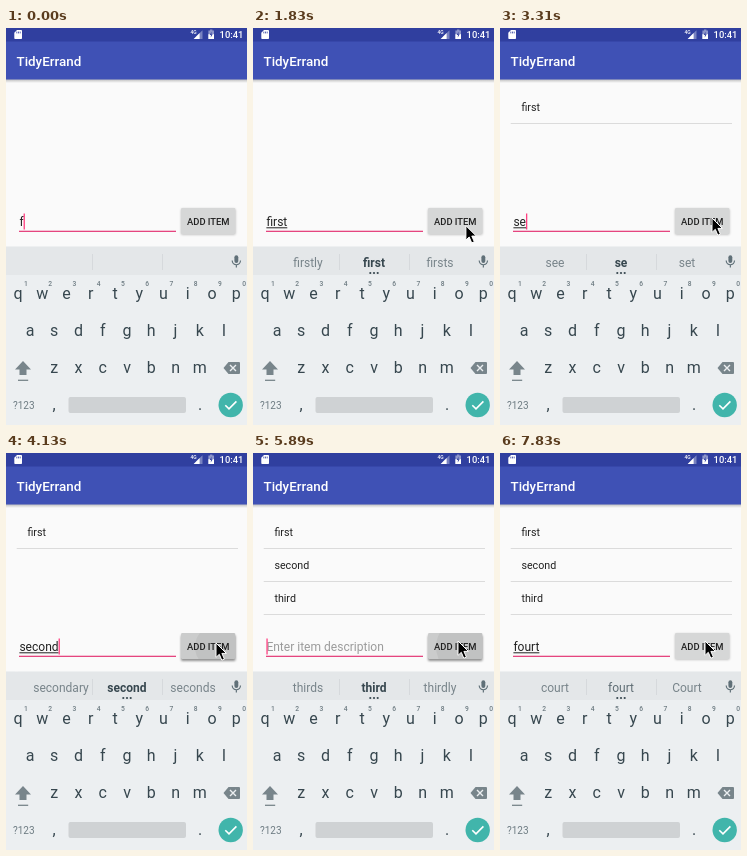
An HTML page that plays this animation: 241x397 px, repeating every 8 s.

```html
<!DOCTYPE html>
<html lang="en">
<head>
<meta charset="utf-8">
<title>To-do list</title>
<style>
html, body { margin: 0; width: 100%; height: 100%; overflow: hidden; background: #fafafa; }
svg { display: block; width: 100vw; height: 100vh; font-family: Roboto, sans-serif; }
.mid { text-anchor: middle; }
.medium { font-weight: 500; }
</style>
</head>
<body>
<svg id="stage" viewBox="0 0 241 397">
  <defs>
    <linearGradient id="shade" x2="0" y2="1">
      <stop stop-color="#000" stop-opacity=".26"/>
      <stop offset="1" stop-color="#000" stop-opacity="0"/>
    </linearGradient>
    <filter id="soft" x="-20%" y="-30%" width="140%" height="170%"><feGaussianBlur stdDeviation="1.1"/></filter>
    <clipPath id="face"><rect x="175" y="180" width="54.5" height="26" rx="1.4"/></clipPath>
  </defs>
  <rect width="241" height="397" fill="#fafafa"/>

  <rect y="51" width="241" height="4" fill="url(#shade)"/>
  <rect y="13" width="241" height="38.5" fill="#3f51b5"/>
  <rect width="241" height="13.5" fill="#303f9f"/>
  <g fill="#fff">
    <path d="M11 2H15.2Q16 2 16 2.8V10.2Q16 11 15.2 11H9.1Q8.3 11 8.3 10.2V4.7Z"/>
    <path d="M10.8 3.6V5.4M12.5 3.6V5.4M14.2 3.6V5.4" stroke="#303f9f" stroke-width=".8"/>
    <text x="184.5" y="5.8" font-size="5" class="medium">4G</text>
    <path d="M196.5 2.2V11H187.7Z" fill-opacity=".35"/>
    <path d="M193.6 5.1V11H187.7Z"/>
    <path d="M204 2.6V1.6H206.4V2.6H208V11H202.4V2.6Z" fill-opacity=".45"/>
    <path d="M202.4 6.2H208V11H202.4Z"/>
    <path d="M205.6 3.8L203.7 7H205L204.7 9.6L206.7 6.2H205.4Z" fill="#303f9f"/>
    <text x="213.6" y="10.2" font-size="9.4" class="medium">10:41</text>
    <text x="10.5" y="38" font-size="13.4" class="medium">TidyErrand</text>
  </g>

  <g id="list"></g>

  <text id="hint" x="13.4" y="198" font-size="12.04" fill="#9b9b9b">Enter item description</text>
  <text id="entry" x="13.4" y="198" font-size="12.04" fill="#212121"></text>
  <rect id="under" x="13.4" y="199.3" height="1" fill="#212121"/>
  <rect x="13" y="202.7" width="157" height="1.3" fill="#e5457f"/>
  <rect id="caret" y="185.5" width="1.3" height="16" fill="#ff4081"/>

  <rect id="shadow" x="175" y="181" width="54.5" height="26" rx="1.5" filter="url(#soft)"/>
  <g clip-path="url(#face)">
    <rect x="175" y="180" width="54.5" height="26" fill="#d6d7d7"/>
    <rect id="press" x="175" y="180" width="54.5" height="26"/>
    <circle id="ripple" cy="194"/>
  </g>
  <text class="mid medium" x="202.3" y="196.6" font-size="9.4" fill="#212121">ADD ITEM</text>

  <rect y="218.5" width="241" height="29" fill="#e4e7e9"/>
  <rect y="247" width="241" height="150" fill="#eceff1"/>
  <path d="M86.5 226V242M156.5 226V242" stroke="#d2d6d8" stroke-width=".8"/>
  <g id="words" class="mid" font-size="12.04">
    <text x="55" y="239" fill="#78848a"></text>
    <text x="121" y="239" fill="#37474f"></text>
    <text x="187" y="239" fill="#78848a"></text>
  </g>
  <g id="dots" fill="#37474f">
    <circle cx="117.3" cy="245" r="1.1"/><circle cx="121" cy="245" r="1.1"/><circle cx="124.7" cy="245" r="1.1"/>
  </g>
  <g fill="none" stroke="#607078" stroke-width="1.2">
    <rect x="228.4" y="227.2" width="3.9" height="7.8" rx="1.95" fill="#607078" stroke="none"/>
    <path d="M226.2 232.6A4.1 4.1 0 0 0 234.5 232.6M230.35 236.6V239.6"/>
  </g>

  <g id="keys" class="mid" fill="#37474f"></g>
  <path d="M17 333L25 341.5H20.5V347H13.5V341.5H9Z" fill="#78858b"/>
  <path d="M12 352.3H22.2" stroke="#78858b" stroke-width="1.3"/>
  <path d="M222.5 334H233Q234 334 234 335V345Q234 346 233 346H222.5L217.5 340Z" fill="#78858b"/>
  <path d="M224 337L230 343M230 337L224 343" stroke="#eceff1" stroke-width="1.4"/>
  <text x="7" y="380.5" font-size="10" fill="#6d7b82">?123</text>
  <rect x="62.5" y="369" width="117.5" height="16" rx="2" fill="#cfd2d4"/>
  <circle cx="224.7" cy="377" r="12.2" fill="#41b5ab"/>
  <path d="M219.3 377.2L223 380.9L230.4 373.4" fill="none" stroke="#fff" stroke-width="1.6"/>

  <path id="pointer" d="M0 0V14.4L3.3 11.3L5.8 17.2L8.4 16.1L5.9 10.4H10.4Z" fill="#000" stroke="#fff" stroke-width="1"/>
</svg>
<script>
const LOOP = 8000;
const $ = id => document.getElementById(id);
const make = (parent, tag, attrs, text = '') => {
  const el = document.createElementNS('http://www.w3.org/2000/svg', tag);
  for (const k in attrs) el.setAttribute(k, attrs[k]);
  el.textContent = text;
  return parent.appendChild(el);
};
const set = (id, attrs) => { for (const k in attrs) $(id).setAttribute(k, attrs[k]); };
const show = (el, on) => el.setAttribute('visibility', on ? 'visible' : 'hidden');
const last = (rows, t) => rows.filter(r => r[0] <= t).pop();

// time, text in the field
const typing = [
  [0, 'f'], [530, 'fi'], [700, 'fir'], [860, 'firs'], [1000, 'first'], [2280, ''],
  [3080, 's'], [3250, 'se'], [3420, 'sec'], [3510, 'seco'], [3610, 'secon'], [3720, 'second'], [4180, ''],
  [4710, 't'], [4880, 'th'], [4990, 'thi'], [5110, 'thir'], [5230, 'third'], [5830, ''],
  [6400, 'f'], [6580, 'fo'], [6750, 'fou'], [6930, 'four'], [7230, 'fourt']
];
// time, suggestions
const hints = [
  [0, ''], [60, 'if f for'], [590, 'fit fi fix'], [760, 'for fir fire'], [910, 'first firs fits'],
  [1060, 'firstly first firsts'], [2340, ''],
  [3140, 'so s see'], [3310, 'see se set'], [3420, 'sex sec sect'], [3510, 'second seco seco'],
  [3610, 'second secon son'], [3780, 'secondary second seconds'], [4300, ''],
  [4760, 'to t the'], [4880, 'the th that'], [4990, 'this thi thin'], [5110, 'third thir their'],
  [5290, 'thirds third thirdly'], [6000, ''],
  [6640, 'for fo of'], [6810, 'four fou for'], [6990, 'fours four for'], [7350, 'court fourt Court']
];
const blinks = [[1540, 2040], [2780, 3080], [5740, 5830], [6350, 6400], [7830, 8000]];
const items = [[2280, 'first'], [4180, 'second'], [5830, 'third']];
// press, settle, end
const clicks = [[2100, 2340, 2560], [4010, 4300, 4540], [5710, 6000, 6180]];
// time, x, y of the pointer tip
const track = [[1600, 216, 224], [2040, 212, 190], [3990, 212, 190], [4010, 210, 190],
  [4180, 210, 190], [4300, 210, 188], [5700, 210, 188], [5770, 205, 188], [8000, 205, 188]];

const rows = items.map(([at, name], i) => {
  const g = make($('list'), 'g', {});
  make(g, 'text', { x: 21.4, y: 83 + 33 * i, 'font-size': 10.7, fill: '#212121' }, name);
  make(g, 'rect', { x: 10.7, y: 95 + 33 * i, width: 221.3, height: 0.9, fill: '#d9d9d9' });
  return g;
});

const key = (x, y, c) => make($('keys'), 'text', { x, y, 'font-size': 16 }, c);
[['qwertyuiop', 12, 271], ['asdfghjkl', 24, 308], ['zxcvbnm', 48.3, 345]].forEach(([row, x, y]) =>
  [...row].forEach((c, i) => key(x + 24.25 * i, y, c)));
key(48, 381.5, ',');
key(194, 381.5, '.');
[...'1234567890'].forEach((c, i) => make($('keys'), 'text',
  { x: 19.8 + 24.25 * i, y: 257.5, 'font-size': 6.7, 'font-weight': 500, fill: '#6d7b82' }, c));

function pointerAt(t) {
  const i = track.findIndex(p => p[0] > t);
  if (i < 1) return null;
  const [a, b] = [track[i - 1], track[i]];
  const u = (t - a[0]) / (b[0] - a[0]);
  const e = u * (2 - u);
  return [a[1] + (b[1] - a[1]) * e, a[2] + (b[2] - a[2]) * e];
}

function drawButton(t) {
  const c = clicks.find(([p, , end]) => t >= p && t < end);
  let press = 0, ripple = 0, r = 0;
  if (c) {
    const held = t < c[1];
    const age = Math.floor((t - c[0]) / 60) * 60;
    press = held ? 0.05 : 0.01;
    ripple = held ? 0.05 : 0.02;
    r = 10 + age * 0.1;
  }
  set('press', { 'fill-opacity': press });
  set('ripple', { cx: 211, r, 'fill-opacity': ripple });
  set('shadow', { y: press > 0.02 ? 182 : 180.8, 'fill-opacity': press > 0.02 ? 0.42 : 0.25 });
}

function draw(t) {
  const text = last(typing, t)[1];
  const words = last(hints, t)[1].split(' ');
  const full = words.length > 1;

  $('entry').textContent = text;
  const width = text ? $('entry').getComputedTextLength() : 0;
  show($('hint'), !text);
  set('under', { width: full ? width : 0 });
  set('caret', { x: 13.4 + width });
  show($('caret'), !blinks.some(([a, b]) => t >= a && t < b));

  [...$('words').children].forEach((el, i) => { el.textContent = words[i] || ''; });
  const mid = $('words').children[1];
  const known = words[1] !== 'fourt';
  mid.setAttribute('font-weight', known ? 700 : 400);
  mid.setAttribute('fill', known ? '#37474f' : '#5f6d74');
  show($('dots'), full);

  rows.forEach((g, i) => show(g, t >= items[i][0]));
  drawButton(t);

  const p = pointerAt(t);
  show($('pointer'), p);
  if (p) set('pointer', { transform: `translate(${p[0]} ${p[1]})` });
}

const start = performance.now();
function tick() {
  draw((performance.now() - start) % LOOP);
  requestAnimationFrame(tick);
}
tick();
</script>
</body>
</html>
```
